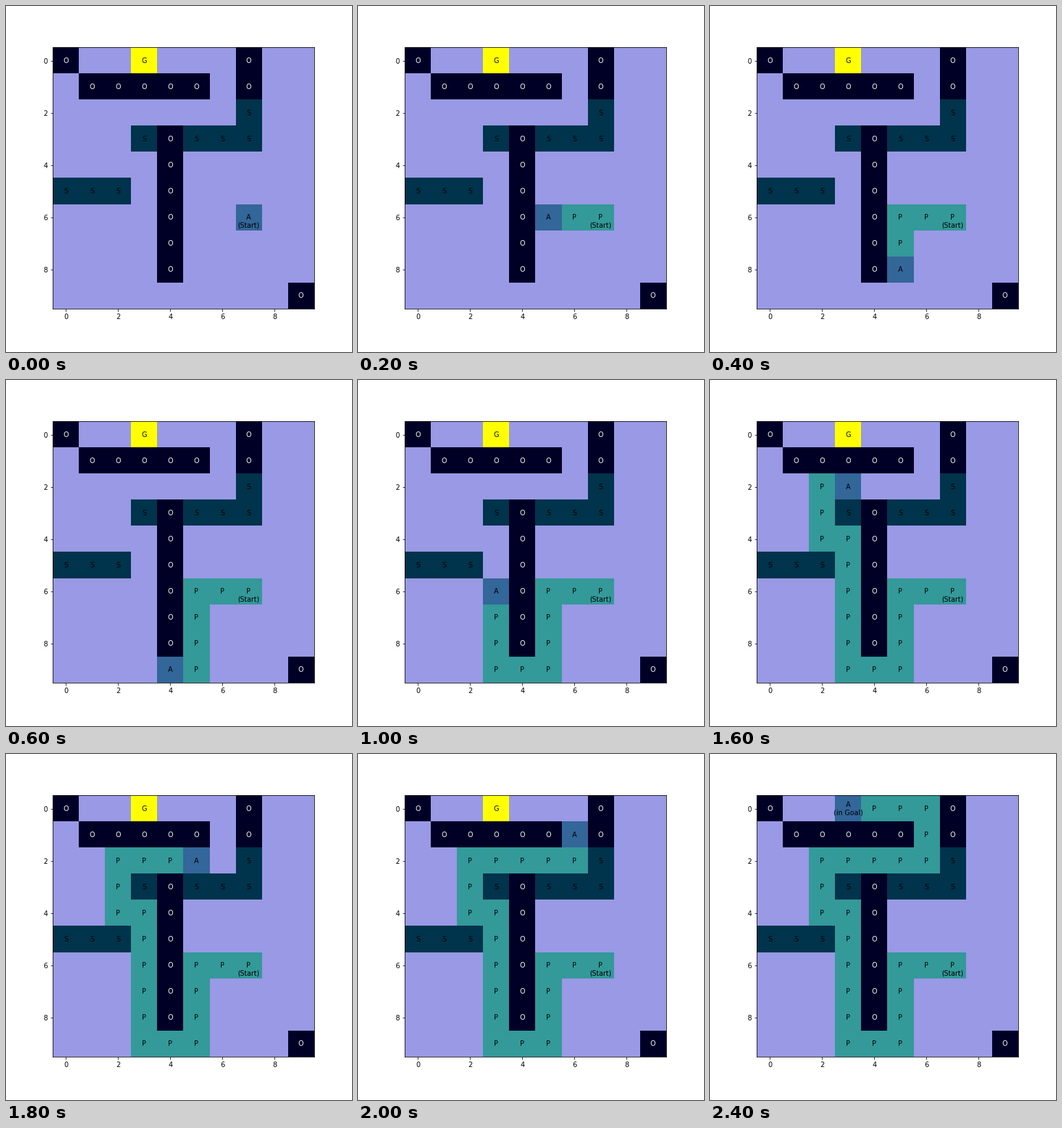
Recreate the animation shown at these times as a matplotlib script. Size 504 by 504 pixels, loop 3000 ms.

```python
import numpy as np
import matplotlib.pyplot as plt
from matplotlib.animation import FuncAnimation

SIZE = 10
FRAMES, INTERVAL = 30, 100

COLORS = {
    " ": (0.6, 0.6, 0.9),
    "O": (0.0, 0.0, 0.15),
    "S": (0.0, 0.2, 0.3),
    "P": (0.2, 0.6, 0.6),
    "A": (0.2, 0.4, 0.6),
    "G": (1.0, 1.0, 0.0),
}

WORLD = [
    "O  G   O  ",
    " OOOOO O  ",
    "       S  ",
    "   SOSSS  ",
    "    O     ",
    "SSS O     ",
    "    O     ",
    "    O     ",
    "    O     ",
    "         O",
]

START, GOAL = (7, 6), (3, 0)
MOVES = "LLDDDLLUUUUULUURRRRUULLL"
STEP = {"L": (-1, 0), "R": (1, 0), "U": (0, -1), "D": (0, 1)}


def walk(start, moves):
    path = [start]
    for move in moves:
        x, y = path[-1]
        dx, dy = STEP[move]
        path.append((x + dx, y + dy))
    return path


PATH = walk(START, MOVES)


def world_at(frame):
    """Cells of the grid once the agent has made `frame` moves."""
    cells = [list(row) for row in WORLD]
    now = min(frame, len(PATH) - 1)
    for x, y in PATH[:now]:
        cells[y][x] = "P"
    x, y = PATH[now]
    cells[y][x] = "A"
    return cells


def to_rgb(cells):
    return np.array([[COLORS[c] for c in row] for row in cells])


plt.rcParams.update({"font.family": "DejaVu Sans", "font.size": 10})
fig, ax = plt.subplots(figsize=(7, 7), dpi=72, facecolor="white")
fig.subplots_adjust(left=0.125, right=0.9, bottom=0.125, top=0.88)

image = ax.imshow(to_rgb(world_at(0)))
labels = [[ax.text(x, y, "", ha="center", va="center") for x in range(SIZE)]
          for y in range(SIZE)]
ax.text(*START, "\n\n(Start)", ha="center", va="center")


def update(frame):
    cells = world_at(frame)
    image.set_data(to_rgb(cells))
    for y, row in enumerate(cells):
        for x, cell in enumerate(row):
            at_goal = cell == "A" and (x, y) == GOAL
            labels[y][x].set_text("A\n(in Goal)" if at_goal else cell.strip())
            labels[y][x].set_color("white" if cell == "O" else "black")
    return [image]


anim = FuncAnimation(fig, update, frames=FRAMES, interval=INTERVAL,
                     repeat=True, repeat_delay=0, blit=False)
plt.show()
```
